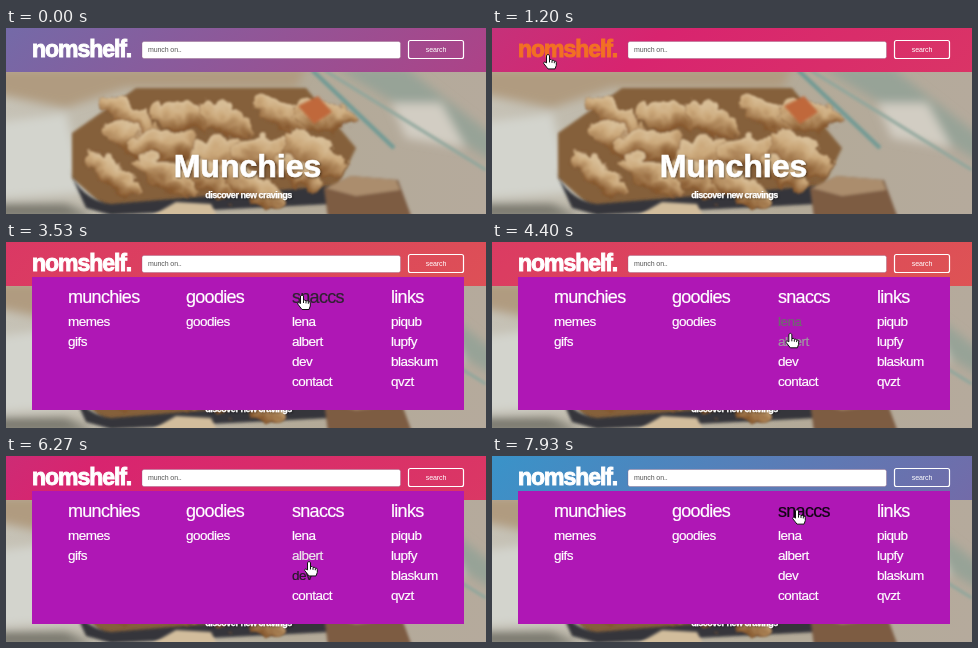
These frames come from a looping animation (480x186 px, 8 s). An HTML page:

```html
<!DOCTYPE html>
<html lang="en">
<head>
<meta charset="utf-8">
<title>Snack menu</title>
<style>
  html, body { margin: 0; width: 100%; height: 100%; overflow: hidden; }
  svg { display: block; width: 480px; height: 186px; font-family: "Liberation Sans", Arial, sans-serif; }
  .logo { font-size: 23px; font-weight: bold; letter-spacing: -1.05px; stroke-width: 1; }
  .title { font-size: 32px; font-weight: bold; stroke: #fff; stroke-width: .6; }
  .sub { font-size: 9px; font-weight: bold; letter-spacing: -.47px; stroke: #fff; stroke-width: .25; }
  .small { font-size: 7px; letter-spacing: -.1px; }
  .head { font-size: 18px; letter-spacing: -.7px; stroke-width: .2; }
  .item { font-size: 13.5px; letter-spacing: -.5px; stroke-width: .2; }
</style>
</head>
<body>
<svg viewBox="0 0 480 186">
  <defs>
    <linearGradient id="sky" gradientUnits="userSpaceOnUse" x2="2160" y2="2160">
      <stop offset="0" stop-color="#3cc9a0"/>
      <stop offset=".3333" stop-color="#3b92c8"/>
      <stop offset=".6667" stop-color="#d8246f"/>
      <stop offset="1" stop-color="#e0664a"/>
    </linearGradient>
    <linearGradient id="table" x2="1">
      <stop offset="0" stop-color="#c6c2b6"/>
      <stop offset=".6" stop-color="#b3aa98"/>
      <stop offset="1" stop-color="#b5aa9c"/>
    </linearGradient>
    <linearGradient id="dough" x2=".3" y2="1">
      <stop offset="0" stop-color="#e0cba8"/>
      <stop offset=".5" stop-color="#cba87a"/>
      <stop offset="1" stop-color="#87592f"/>
    </linearGradient>
    <filter id="soft" x="-20%" y="-20%" width="140%" height="140%"><feGaussianBlur stdDeviation="1.5"/></filter>
    <filter id="haze" x="-20%" y="-20%" width="140%" height="140%"><feGaussianBlur stdDeviation="5"/></filter>
    <filter id="crumbly" x="-10%" y="-10%" width="120%" height="120%">
      <feTurbulence baseFrequency=".045" numOctaves="2" seed="4"/>
      <feDisplacementMap in="SourceGraphic" scale="16" xChannelSelector="R" yChannelSelector="G"/>
      <feGaussianBlur stdDeviation="1"/>
    </filter>
    <filter id="shade"><feDropShadow dx="1" dy="1" stdDeviation="1" flood-opacity=".45"/></filter>
  </defs>

  <rect y="40" width="480" height="146" fill="url(#table)"/>
  <g filter="url(#haze)">
    <path d="M-10 40H300L290 60H120L60 80-10 66Z" fill="#b09b80"/>
    <path d="M-10 95 60 85 80 165-10 170Z" fill="#d3d4cd"/>
    <path d="M330 40H400L490 110V135Z" fill="#97a397"/>
    <path d="M385 75H435L460 120 400 110Z" fill="#d2cdc3"/>
    <path d="M-10 176H60L90 190H-10Z" fill="#77766c"/>
  </g>
  <path d="M66 105 130 60H300L350 120 325 172 100 180 66 150Z" fill="#85603a" filter="url(#soft)"/>
  <path d="M62 140Q75 172 105 176L325 158V176L105 187 80 180Z" fill="#34363a" filter="url(#soft)"/>
  <g id="cookies" fill="url(#dough)" stroke="#7d5330" stroke-opacity=".5" filter="url(#crumbly)"></g>
  <g filter="url(#soft)" fill="none">
    <path d="M292 78 312 68 326 84 308 96Z" fill="#c0673a"/>
    <path d="M306 42 388 120" stroke="#6f9a94" stroke-width="4"/>
    <path d="M318 42 480 142" stroke="#8ea69c" stroke-width="3"/>
    <path d="M318 160 345 148 392 152 406 190H322Z" fill="#7d5c43"/>
    <path d="M320 160 345 148 390 152 394 162 350 168Z" fill="#ab8d6d"/>
    <path d="M142 190 170 174 205 176 212 190Z" fill="#d2bd9c"/>
  </g>
  <g fill="#fff" text-anchor="middle" filter="url(#shade)">
    <text class="title" x="241.5" y="149">Munchies</text>
    <text class="sub" x="242.5" y="170">discover new cravings</text>
  </g>

  <rect width="480" height="44" fill="url(#sky)"/>
  <text class="logo" id="logo" x="26" y="29">nomshelf.</text>
  <rect x="136" y="13.5" width="258.5" height="17" rx="2" fill="#fff" stroke="#8a5878" stroke-opacity=".5" stroke-width=".7"/>
  <text class="small" x="142" y="24.4" fill="#555">munch on..</text>
  <rect x="402.5" y="12.5" width="55" height="18" rx="2" fill="none" stroke="#fff" stroke-width="1.2"/>
  <text class="small" x="430" y="24.4" fill="#fff" text-anchor="middle">search</text>

  <g id="menu"><rect x="26" y="35" width="432" height="133" fill="#af17b5"/></g>
  <path id="hand" fill="#fff" stroke="#111" stroke-linejoin="round"
    d="M-1.5 1Q0-1 1.5 1V5.5Q3 4 4 6 5.5 5 6.3 6.8 8 6 8.3 8V11L7 14.5H0L-4.3 9Q-4.5 6.5-1.5 8.5ZM1.5 5.5V8M4 6.2V8.4M6.3 7V8.8"/>
</svg>
<script>
const LOOP = 8000, MENU_OPENS = 1450, FADE = 250, SAMPLES = 25;
const byId = id => document.getElementById(id);
const clamp = v => Math.max(0, Math.min(1, v));
const mix = (a, b, k) => a + (b - a) * k;
const rgbMix = (a, b, k) => `rgb(${a.map((v, i) => Math.round(mix(v, b[i], k)))})`;
const WHITE = [255, 255, 255], BLACK = [18, 5, 20], ORANGE = [242, 112, 36];

function addSvg(parent, tag, attrs, text = '') {
  const el = document.createElementNS('http://www.w3.org/2000/svg', tag);
  for (const name in attrs) el.setAttribute(name, attrs[name]);
  el.textContent = text;
  return parent.appendChild(el);
}

// A pile of cookies in three overlapping rows
let seed = 11;
const jitter = size => ((seed = seed * 16807 % 2147483647) / 2147483647 - .5) * 2 * size;
for (let row = 0; row < 3; row++) {
  for (let i = 0; i < 5; i++) {
    const cx = 128 - 12 * row + 46 * i + jitter(8), cy = 84 + 31 * row + jitter(8);
    addSvg(byId('cookies'), 'ellipse', {
      cx, cy, rx: 33 + jitter(5), ry: 15 + jitter(3),
      transform: `rotate(${18 + jitter(22)} ${cx} ${cy})`,
    });
  }
}

const columns = {
  62: 'munchies memes gifs',
  180: 'goodies goodies',
  286: 'snaccs lena albert dev contact',
  385: 'links piqub lupfy blaskum qvzt',
};
const links = Object.entries(columns).flatMap(([left, words]) => words.split(' ').map((word, row) => {
  const x = +left, y = row ? 64 + 20 * row : 60.5;
  const el = addSvg(byId('menu'), 'text', { class: row ? 'item' : 'head', x, y }, word);
  return { el, box: [x - 5, y - 18, x + 70, y + 2], from: MENU_OPENS, hot: BLACK };
}));
links.push({ el: byId('logo'), box: [24, 8, 127, 36], from: 0, hot: ORANGE });

// Pointer stops: time, x, y
const stops = [[0, 90, 210], [800, 56, 27], [1500, 56, 26], [1850, 60, 45], [2150, 60, 45],
  [3400, 296, 53], [3700, 296, 53], [5200, 301, 135], [5500, 301, 135],
  [7040, 305, 76], [7130, 305, 61], [LOOP, 305, 53]];

function pointer(time) {
  const t = Math.max(0, time);
  const i = Math.max(1, stops.findIndex(stop => stop[0] >= t));
  const [t0, x0, y0] = stops[i - 1], [t1, x1, y1] = stops[i];
  const k = clamp((t - t0) / (t1 - t0));
  return [mix(x0, x1, k), mix(y0, y1, k)];
}

// Share of the recent past spent over a link, which gives a linear colour fade
function hoverAmount({ box: [l, t, r, b], from }, trail) {
  const hits = trail.filter(([x, y, time]) => time >= from && x >= l && x < r && y >= t && y < b);
  return hits.length / trail.length;
}

// cubic-bezier(.25, .1, .25, 1)
function ease(x) {
  const curve = (a, b, u) => 3 * (1 - u) ** 2 * u * a + 3 * (1 - u) * u * u * b + u ** 3;
  let low = 0, high = 1;
  for (let i = 0; i < 20; i++) {
    const mid = (low + high) / 2;
    if (curve(.25, .25, mid) < x) low = mid; else high = mid;
  }
  return curve(.1, 1, low);
}

function draw(t) {
  const phase = (t + 2200) / 7300;
  const p = phase < 1 ? ease(phase) : 1 - ease(phase - 1);
  const shift = 4320 / 3 * (.3 + 2.06 * p);
  byId('sky').setAttribute('gradientTransform', `translate(${-shift})`);

  const trail = Array.from({ length: SAMPLES }, (_, i) => {
    const time = t - i * FADE / SAMPLES;
    return [...pointer(time), time];
  });
  for (const link of links) {
    const color = rgbMix(WHITE, link.hot, hoverAmount(link, trail));
    link.el.setAttribute('fill', color);
    link.el.setAttribute('stroke', color);
  }
  byId('menu').setAttribute('opacity', clamp((t - MENU_OPENS) / 150));
  byId('hand').setAttribute('transform', `translate(${pointer(t)})`);
}

const start = performance.now();
function tick() {
  draw((performance.now() - start) % LOOP);
  requestAnimationFrame(tick);
}
tick();
</script>
</body>
</html>
```
